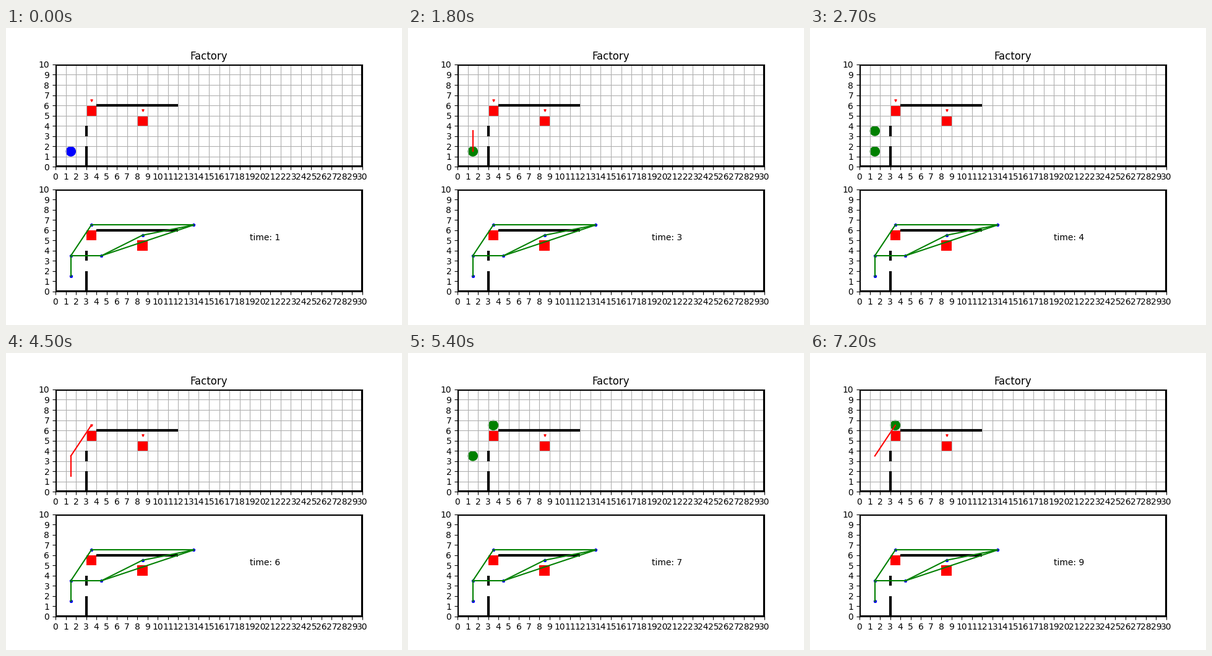
Animation of 640x480 px, one loop 8 s. Source, as a matplotlib script:

```python
import matplotlib.pyplot as plt
from matplotlib.animation import FuncAnimation
from matplotlib.collections import LineCollection
from matplotlib.patches import Circle, Rectangle

STEP_MS = 900
LOOP_MS = 8000
TICK_MS = 100
W, H = 30, 10

WALLS = [
    [(0, 0), (W, 0)], [(W, 0), (W, H)], [(W, H), (0, H)], [(0, H), (0, 0)],
    [(3, 0), (3, 2)], [(3, 3), (3, 4)], [(4, 6), (12, 6)],
]
MACHINES = [(3, 5), (8, 4)]
DOCKS = [(3.5, 6.5), (8.5, 5.5)]
START, JUNCTION, TABLE = (1.5, 1.5), (1.5, 3.5), (3.5, 6.5)
GATE, DESK, EXIT = (4.5, 3.5), (8.5, 5.5), (13.5, 6.5)
NODES = [START, JUNCTION, TABLE, GATE, DESK, EXIT]
EDGES = [
    (START, JUNCTION), (JUNCTION, TABLE), (JUNCTION, GATE), (TABLE, EXIT),
    (GATE, DESK), (DESK, EXIT), (GATE, EXIT),
]
ROUTE = [START, JUNCTION, TABLE]
LEG_STEPS = 3

fig, (floor, graph) = plt.subplots(2, 1, figsize=(6.4, 4.8), dpi=100)


def setup(ax):
    ax.set_xlim(0, W)
    ax.set_ylim(0, H)
    ax.set_aspect("equal")
    ax.set_xticks(range(W + 1))
    ax.set_yticks(range(H + 1))
    ax.add_collection(LineCollection(WALLS, colors="k", linewidths=3),
                      autolim=False)
    for corner in MACHINES:
        ax.add_patch(Rectangle(corner, 1, 1, facecolor="r"))


def connect(ax, a, b, color):
    return ax.plot(*zip(a, b), color=color, lw=1.5, scalex=False, scaley=False)[0]


setup(floor)
setup(graph)
floor.set_title("Factory")
floor.grid(True)
floor.scatter(*zip(*DOCKS), s=5, c="r", marker="v")
graph.scatter(*zip(*NODES), s=10, c="b", marker="p")
for a, b in EDGES:
    connect(graph, a, b, "g")
clock = graph.text(19, 5, "time: 1")


class Robot:
    """Waits at each stop for one step, then travels for two."""

    def __init__(self, appears, departs):
        self.appears, self.departs = appears, departs
        self.body = floor.add_patch(Circle(START, 0.5, facecolor="g"))
        self.trail = connect(floor, START, START, "r")

    def update(self, t):
        leg, phase = divmod(max(t - self.departs, 0), LEG_STEPS)
        moving = phase > 0 and leg < len(ROUTE) - 1
        stop = min(leg, len(ROUTE) - 1)
        self.body.set_visible(t >= self.appears and not moving)
        self.body.set_center(ROUTE[stop])
        self.body.set_facecolor("b" if t == 1 else "g")
        self.trail.set_visible(moving)
        if moving:
            self.trail.set_data(*zip(ROUTE[stop], ROUTE[stop + 1]))


robots = [Robot(1, 1), Robot(2, 4)]


def update(i):
    t = i * TICK_MS // STEP_MS + 1
    clock.set_text(f"time: {t}")
    for robot in robots:
        robot.update(t)
    return []


anim = FuncAnimation(fig, update, frames=LOOP_MS // TICK_MS, interval=TICK_MS,
                     init_func=lambda: update(0), repeat=True, repeat_delay=0)
plt.show()
```
